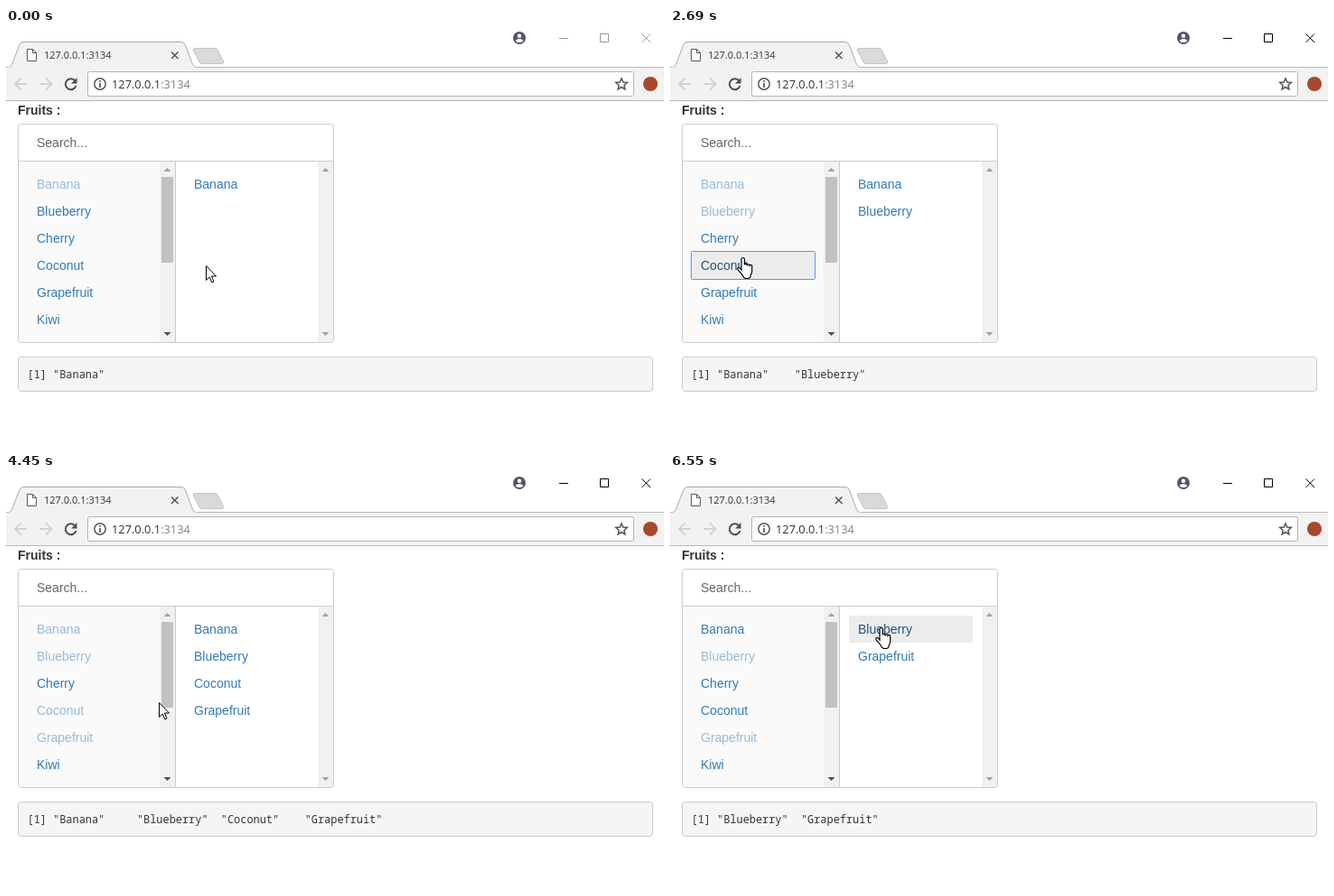
Write an HTML page that moves like this. It is 728 px wide and 462 px high and loops after 7.39 s.

```html
<!DOCTYPE html>
<html lang="en">
<head>
<meta charset="utf-8">
<title>Fruit picker</title>
<style>
  html, body { margin: 0; width: 100%; height: 100%; overflow: hidden; background: #fff; }
  svg { display: block; font: 14px "Liberation Sans", Arial, sans-serif; }
  .ui { font-family: "Open Sans", sans-serif; }
  #output { font: 11.92px "Noto Sans Mono", monospace; white-space: pre; }
  .line { fill: none; stroke-width: 1; }
  .item { fill: #337ab7; }
  .item.hover { fill: #23527c; }
  .item rect { fill: #ececec; }
  .item .focus { fill: none; stroke: #5c96f0; }
  .chosen { opacity: .5; }
</style>
</head>
<body>
<svg width="728" height="462" viewBox="0 0 728 462">
  <!-- Window frame -->
  <rect y="43" width="728" height="38" fill="#f2f2f2"/>
  <path class="line" d="M0 43.5H728M0 80.5H728" stroke="#b8b8b8"/>
  <path d="M3 44Q5.5 43 6.5 40.5L15 18.500Q16 15.500 19 15.500H194Q197 15.500 198.200 18.500L206.500 40.500Q207.500 43 210 44" fill="#f2f2f2" stroke="#a9a9a9"/>
  <path d="M3 43.500H210V46H3Z" fill="#f2f2f2"/>
  <path d="M208.500 22.500H231Q233.500 22.500 234.500 25L240.500 37Q241.500 39.500 239 39.500H217Q214.500 39.500 213.500 37L207.500 25Q206.500 22.500 208.500 22.500Z" fill="#d9d9d9" stroke="#c4c4c4"/>
  <path d="M23.500 23.500H29.500L33.500 27.500V36.500H23.500ZM29.500 23.500V27.500H33.500" fill="#fff" stroke="#5a5a5a"/>
  <text class="ui" x="42" y="34" font-size="11" fill="#333">127.0.0.1:3134</text>
  <path class="line" d="M183 26.500L190.500 34M190.500 26.500L183 34" stroke="#555" style="stroke-width:1.5"/>
  <circle cx="568" cy="11" r="7" fill="#54546c"/>
  <circle cx="568" cy="8.700" r="2.200" fill="#fff"/>
  <path d="M563.700 14.500Q564.500 12 568 12T572.300 14.500Q570.500 16 568 16T563.700 14.500Z" fill="#fff"/>
  <path id="controls" class="line" d="M612 11.500H622M657.500 6.500H666.500V15.500H657.500ZM703.500 6.500L713 16M713 6.500L703.500 16"/>

  <!-- Toolbar -->
  <g class="line" style="stroke-width:2">
    <path d="M23 62H10.500M16.500 55.500L10 62L16.500 68.500M37 62H50M44 55.500L50.500 62L44 68.500" stroke="#d2d2d2"/>
    <path d="M76.500 58.500A6 6 0 1 0 77.500 64" stroke="#4d4d4d"/>
  </g>
  <path d="M78.500 55V61.500H72Z" fill="#4d4d4d"/>
  <rect x="90.500" y="48.500" width="604" height="27" rx="2" fill="#fff" stroke="#b3b3b3"/>
  <circle cx="104" cy="62" r="6.200" fill="none" stroke="#555" stroke-width="1.500"/>
  <path d="M103.200 58H104.900V59.800H103.200ZM103.200 61H104.900V66H103.200Z" fill="#555"/>
  <text class="ui" x="117" y="67" font-size="12.800" fill="#333">127.0.0.1<tspan fill="#808080">:3134</tspan></text>
  <path class="line" d="M681 55.800L682.800 60L687.300 60.400L683.900 63.400L684.900 67.900L681 65.500L677.100 67.900L678.100 63.400L674.700 60.400L679.200 60Z" stroke="#555" style="stroke-width:1.500"/>
  <circle cx="713" cy="62" r="8" fill="#a9472c"/>

  <!-- Page -->
  <text x="13" y="96" font-weight="bold" fill="#333">Fruits :</text>
  <rect x="14" y="148" width="173" height="200" fill="#fafafa"/>
  <path d="M170 148H187V348H170ZM345 148H362V348H345Z" fill="#f1f1f1"/>
  <rect id="thumb" x="172" y="165" width="13" height="95"/>
  <path d="M174.500 159L178.500 155L182.500 159ZM349.500 159L353.500 155L357.500 159ZM349.500 337L353.500 341L357.500 337Z" fill="#a3a3a3"/>
  <path d="M174.500 337L178.500 341L182.500 337Z" fill="#505050"/>
  <path class="line" d="M14 147.500H362M187.500 148V348" stroke="#ccc"/>
  <rect class="line" x="13.500" y="106.500" width="349" height="242" rx="3" stroke="#ccc"/>
  <text x="34" y="132" fill="#666">Search...</text>
  <g id="lists"></g>
  <rect x="13.500" y="364.500" width="702" height="38" rx="3.500" fill="#f5f5f5" stroke="#ccc"/>
  <text id="output" x="23.500" y="388" fill="#333"></text>

  <g id="cursor" fill="#fff" stroke="#000">
    <path id="arrow" d="M.5.5V16.500L4.200 12.900L6.800 18.900L9 17.900L6.400 12H11.500Z"/>
    <path id="hand" transform="translate(-6)" stroke-width="1.200" d="M5 14V2.200a1.700 1.700 0 0 1 3.400 0V8.400a1.500 1.500 0 0 1 2.900.2a1.500 1.500 0 0 1 2.800.6a1.400 1.400 0 0 1 2.600.9V15.500c0 2.300-1.500 3.300-1.600 5.200q-.2 2.800-4 2.800q-3.600 0-4.400-2.700C5.600 18.500 3 16.200 1 13.600c-.9-1.700 1-2.900 2.300-1.700z"/>
  </g>
</svg>
<script>
const LOOP = 7390;
const fruits = ["Banana", "Blueberry", "Cherry", "Coconut", "Grapefruit", "Kiwi"];
const smooth = p => p * p * (3 - 2 * p);
const accelerate = p => p * p * (.5 + .5 * p) ** .3;
const decelerate = p => p * (2 - p);

// Pointer moves: first step, last step, number of steps, x, y, easing
const moves = [
  [70, 603, 8, 96, 199],
  [680, 680, 1, 96, 198],
  [1600, 1600, 1, 95, 198],
  [1690, 1980, 5, 80, 249],
  [2210, 2300, 2, 80, 254],
  [2836, 3300, 7, 81, 291],
  [4070, 4070, 1, 81, 292],
  [4150, 4620, 7, 226, 230],
  [5220, 5450, 4, 232, 189, accelerate],
  [5530, 5770, 4, 233, 171, decelerate]
];
const selections = [
  [0, [0]], [1140, [0, 1]], [2760, [0, 1, 3]],
  [3840, [0, 1, 3, 4]], [4990, [0, 1, 4]], [6550, [1, 4]]
];
const presses = [[1060, 1140], [2690, 2760], [3760, 3840], [4910, 4990], [6400, 6550]];

const el = id => document.getElementById(id);
const within = (t, [from, to]) => t >= from && t < to;
const selectedAt = t => selections.filter(([start]) => start <= t).pop()[1];

function pointerAt(t) {
  let x = 221, y = 263;
  for (const [start, end, steps, toX, toY, ease = smooth] of moves) {
    if (t < start) break;
    const interval = (end - start) / (steps - 1) || 1;
    const p = ease(Math.min(1, (1 + Math.floor((t - start) / interval + 1e-6)) / steps));
    x += (toX - x) * p;
    y += (toY - y) * p;
  }
  return [Math.round(x), Math.round(y)];
}

function item(name, left, width, row, chosen, hovered, focused) {
  const top = 158 + row * 30;
  const back = hovered ? `<rect x="${left}" y="${top}" width="${width}" height="30"/>` : "";
  const ring = focused
    ? `<rect class="focus" x="${left - .5}" y="${top - .5}" width="${width + 1}" height="31" rx="1"/>` : "";
  return `<g class="item ${chosen ? "chosen" : ""} ${hovered ? "hover" : ""}">${back}${ring}
    <text x="${left + 10}" y="${top + 20}">${name}</text></g>`;
}

function printed(names) {
  const quoted = names.map(name => `"${name}"`);
  const width = Math.max(...quoted.map(q => q.length));
  return "[1] " + quoted.map(q => q.padEnd(width)).join(" ");
}

let shown = "";
function draw(t) {
  const [x, y] = pointerAt(t);
  const selected = selectedAt(t);
  const row = Math.floor((y - 158) / 30);
  const onLeft = x >= 24 && x < 160 && row >= 0 && row < fruits.length;
  const onRight = x >= 198 && x < 335 && row >= 0 && row < selected.length;
  const pressed = presses.some(span => within(t, span));
  const justRemoved = within(t, [4990, 5070]);
  const active = t >= 1060;
  const output = printed(selectedAt(justRemoved ? 4989 : t).map(i => fruits[i]));

  const state = [x, y, selected, pressed, justRemoved, active].join();
  if (state === shown) return;
  shown = state;

  el("lists").innerHTML =
    fruits.map((name, i) => {
      const over = onLeft && row === i;
      return item(name, 24, 136, i, selected.includes(i), over, over && pressed);
    }).join("") +
    selected.map((fruit, i) => {
      const over = onRight && row === i && !justRemoved;
      return item(fruits[fruit], 198, 137, i, false, over, over && pressed);
    }).join("");
  el("output").textContent = output;
  el("controls").setAttribute("stroke", active ? "#000" : "#999");
  const onThumb = x >= 172 && x < 185 && y >= 165 && y < 260;
  el("thumb").setAttribute("fill", onThumb ? "#a8a8a8" : "#c1c1c1");
  el("cursor").setAttribute("transform", `translate(${x} ${y})`);
  const overLink = onLeft || onRight;
  el("hand").style.display = overLink ? "" : "none";
  el("arrow").style.display = overLink ? "none" : "";
}

let begin;
function tick(now) {
  begin ??= now;
  draw((now - begin) % LOOP);
  requestAnimationFrame(tick);
}
draw(0);
requestAnimationFrame(tick);
</script>
</body>
</html>
```
